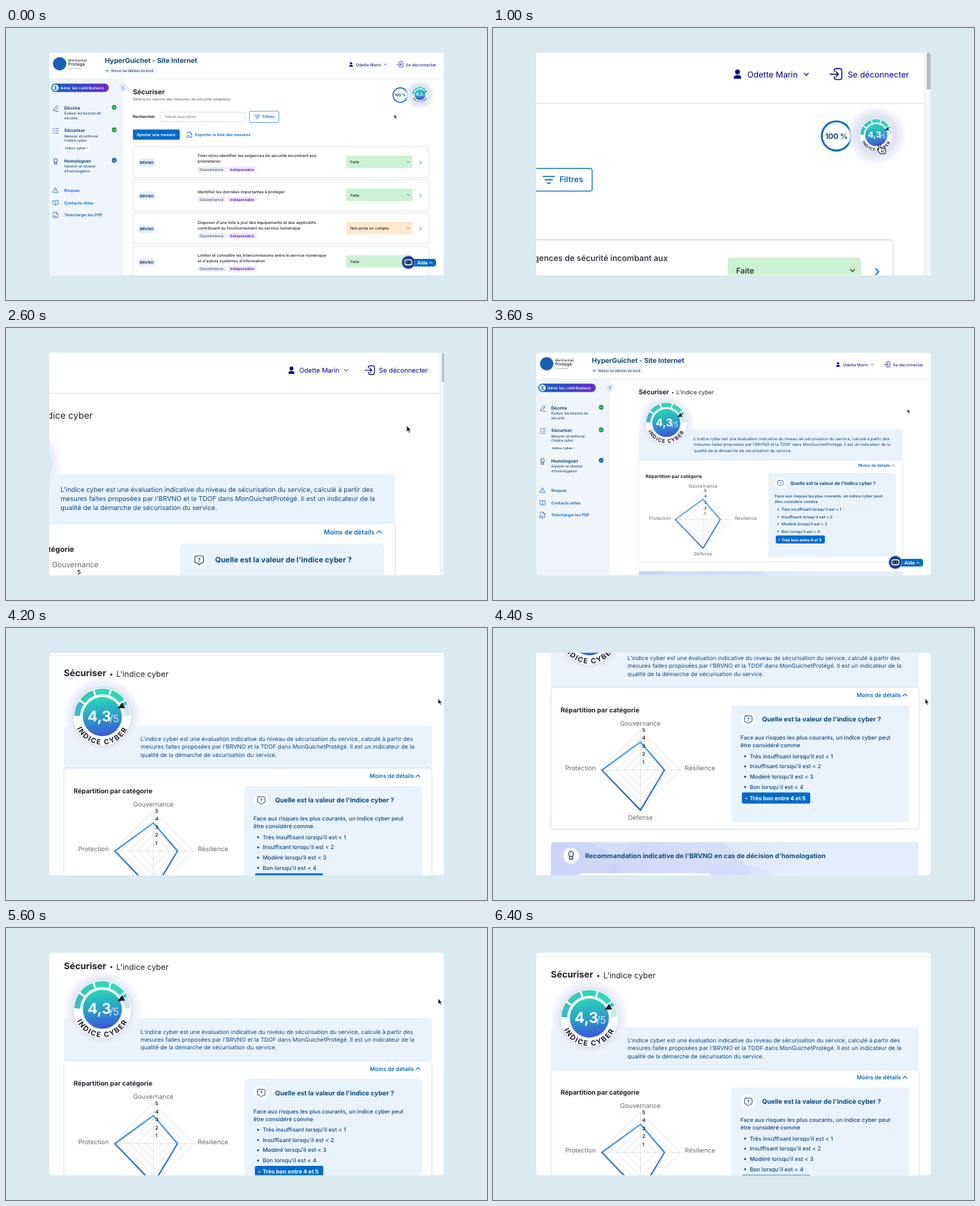
Recreate the animation shown at these times as an HTML page. Size 690 by 390 pixels, loop 7300 ms.

```html
<!DOCTYPE html>
<html lang="fr">
<head>
<meta charset="utf-8">
<title>Indice cyber</title>
<style>
  html, body { margin: 0; width: 100%; height: 100%; overflow: hidden; background: #d9eaf0; }
  svg { display: block; width: 690px; height: 390px; font-family: Inter, "Open Sans", sans-serif; text-rendering: geometricPrecision; }
</style>
</head>
<body>
<svg id="stage" viewBox="0 0 690 390" xmlns="http://www.w3.org/2000/svg"></svg>
<script>
const LOOP = 7300, STEP = 100;
const BLUE = '#036bc8', NAVY = '#0b4a82', INDIGO = '#000091', INK = '#22222c', GREY = '#666672';
const AGENCY = 'BRVNO', PRODUCT = 'MonGuichetProtégé';

// Drawing helpers
const text = (x, y, size, str, fill = INK, weight = 400, anchor = 'start') =>
  `<text x="${x}" y="${y}" font-size="${size}" fill="${fill}" font-weight="${weight}" text-anchor="${anchor}">${str.replace(/</g, '&lt;')}</text>`;
const box = (x, y, w, h, r, fill, extra = '') =>
  `<rect x="${x}" y="${y}" width="${w}" height="${h}" rx="${r}" fill="${fill}" ${extra}/>`;
const disc = (x, y, r, fill, extra = '') => `<circle cx="${x}" cy="${y}" r="${r}" fill="${fill}" ${extra}/>`;
const line = (d, color, width = 0.8, extra = '') =>
  `<path d="${d}" fill="none" stroke="${color}" stroke-width="${width}" stroke-linecap="round" stroke-linejoin="round" ${extra}/>`;
const chevron = (x, y, s, color, turn = 0, width = 0.8) =>
  line(`M${-s} ${-s / 2}L0 ${s / 2}L${s} ${-s / 2}`, color, width, `transform="translate(${x} ${y}) rotate(${turn})"`);
const check = (x, y, color) =>
  disc(x, y, 3.4, color) + line(`M${x - 1.4} ${y + 0.1}l1 1l1.8 -2`, '#fff', 0.7);
const medal = (x, y, color) =>
  disc(x, y - 1.2, 2.6, 'none', `stroke="${color}" stroke-width=".8"`) +
  line(`M${x - 1.7} ${y + 1}v3.6l1.7 -1l1.7 1v-3.6`, color);
const docIcon = (x, y) =>
  line(`M${x - 3} ${y - 1}v-3h4l2.4 2.4v5.4h-3M${x + 1} ${y - 4}v2.4h2.4M${x - 3.4} ${y + 1.4}h3.4v2.6h-3.4z`, BLUE, 0.7);

const defs = `<defs>
  <clipPath id="card"><rect x="62" y="35.5" width="566" height="319" rx="3"/></clipPath>
  <clipPath id="advice"><rect x="209" y="348.4" width="379" height="63.2" rx="3"/></clipPath>
  <linearGradient id="pill"><stop stop-color="#0a62c6"/><stop offset="1" stop-color="#6a2cc4"/></linearGradient>
  <linearGradient id="core" x1=".4" y1="0" x2=".55" y2="1"><stop stop-color="#2dd6b6"/><stop offset=".5" stop-color="#2a9fca"/><stop offset="1" stop-color="#3a55d8"/></linearGradient>
  <linearGradient id="web" x1="0" y1="0" x2="0" y2="1"><stop stop-color="#48a2e2"/><stop offset="1" stop-color="#1f62b4"/></linearGradient>
  <linearGradient id="tint"><stop stop-color="#d0daf8"/><stop offset=".7" stop-color="#e4edfd"/></linearGradient>
  <radialGradient id="halo"><stop offset=".65" stop-color="#dfe3f3"/><stop offset=".85" stop-color="#edf0fa" stop-opacity=".85"/><stop offset="1" stop-color="#f4f5fd" stop-opacity="0"/></radialGradient>
  <path id="rim" d="M-40 0A40 40 0 0 0 40 0"/>
</defs>`;

// Score badge, drawn around 0,0 with a radius of 42
function badge(x, y, scale, halo) {
  const at = (deg, r) => `${(-r * Math.cos(deg * Math.PI / 180)).toFixed(2)} ${(-r * Math.sin(deg * Math.PI / 180)).toFixed(2)}`;
  const arc = (a, b, color) =>
    `<path d="M${at(a, 36)}A36 36 0 0 1 ${at(b, 36)}" fill="none" stroke="${color}" stroke-width="8.4"/>`;
  const shades = ['#3bbcc4', '#34cabd', '#30d6b8', '#30d6b8', '#cfe6ef'];
  const ring = shades.map((c, i) => arc(i * 36 + 2, i * 36 + 33.5, c)).join('') + arc(146, 153, '#30d0b8');
  return `<g transform="translate(${x} ${y}) scale(${scale})">` +
    disc(0, 0, halo, 'url(#halo)') + disc(0, 0, 42, '#fff', 'stroke="#d3d6e2" stroke-width="1"') + ring + disc(0, 0, 28, 'url(#core)') +
    `<path d="M5 -4.5V4.5L-4.5 0Z" fill="#1b1b35" transform="translate(26 -14) rotate(-28)"/>` +
    text(-21.2, 6.6, 21.2, '4,3', '#fff', 700) + text(10.2, 8.2, 14.5, '/5', '#d5e8fb', 400) +
    `<text font-size="10.2" font-weight="700" fill="#1b1b35" letter-spacing="1.6" text-anchor="middle"><textPath href="#rim" startOffset="50%">INDICE CYBER</textPath></text></g>`;
}

// Header and side bar, shared by both pages
function shell() {
  const item = (y, title, lines) => text(83.5, y, 6.4, title, NAVY, 700) +
    lines.map((s, i) => text(83.5, y + 7.4 + i * 6.6, 4.95, s, NAVY, 500)).join('');
  return box(-100, 0, 900, 520, 0, '#fff') +
    box(-100, 73, 268, 440, 0, '#f0f4fb') +
    line('M-100 73H628', '#e3e3ea', 0.6) +
    disc(77, 51.3, 9.6, '#1460b8') +
    text(89.3, 47.8, 4.6, 'MonGuichet', INK, 500) + text(89.3, 54.3, 6.4, 'Protégé', INK, 500) +
    text(89.3, 58.6, 2.2, 'Innovation ' + AGENCY, GREY) +
    text(141.8, 50, 9.66, 'HyperGuichet - Site Internet', NAVY, 700) +
    box(142, 57.3, 72.5, 8, 1.5, '#f1f4fa') + line('M147.3 61.3h-3.4m1.3 -1.3l-1.3 1.3l1.3 1.3', NAVY, 0.6) +
    text(151, 63.1, 4.9, 'Retour au tableau de bord', NAVY, 500) +
    disc(495, 50.6, 1.7, INDIGO) + `<path d="M492.4 55.4v-.8q0 -1.8 2.6 -1.8t2.6 1.8v.8z" fill="${INDIGO}"/>` +
    text(502, 54.5, 5.85, 'Odette Marin', INDIGO) + chevron(544, 52.3, 1.5, INDIGO, 0, 0.6) +
    line('M564 50.2v-.6q0 -1.4 1.4 -1.4h2.4q1.6 0 1.6 1.6v4.6q0 1.6 -1.6 1.6h-2.4q-1.4 0 -1.4 -1.4v-.6M561 52.2h6m-1.8 -1.8l1.8 1.8l-1.8 1.8', INDIGO, 0.7) +
    text(573.5, 54.5, 5.85, 'Se déconnecter', INDIGO) +
    box(65, 79.8, 82.5, 12, 6, 'url(#pill)') + disc(71, 85.8, 4.6, '#fff') + disc(71, 84.6, 1.4, BLUE) +
    `<path d="M68.6 88.4q.4 -1.9 2.4 -1.9t2.4 1.9z" fill="${BLUE}"/>` +
    text(78, 87.9, 5.7, 'Gérer les contributeurs', '#fff', 500) +
    disc(168, 85.6, 5.7, '#dfe9f9') + chevron(167.6, 85.6, 1.8, NAVY, 90) +
    line('M68.2 118.6l.5 -2.4l4.4 -4.8l1.8 1.7l-4.4 4.8zM71.5 119.6h3.4', NAVY, 0.7) +
    item(116.6, 'Décrire', ['Évaluer les besoins de', 'sécurité']) + check(155.2, 113.7, '#18a04a') +
    [144.3, 147.6, 150.9].map(y => line(`M67.4 ${y}l.7 .7l1.1 -1.4M71 ${y}h4`, NAVY, 0.7)).join('') +
    item(149.2, 'Sécuriser', ['Mesurer et renforcer', "l'indice cyber"]) + check(155.2, 146, '#18a04a') +
    box(82.5, 167.8, 37, 8.6, 2, '#fff') + text(84.8, 174, 4.9, 'Indice cyber', NAVY, 600) + chevron(116.4, 172.2, 1.1, NAVY, -90, 0.6) +
    medal(71, 191, NAVY) + item(193, 'Homologuer', ['Générer un dossier', "d'homologation"]) + check(155.2, 189.7, BLUE) +
    line('M71 229.2l3.8 6.4h-7.6zM71 231.6v1.8', BLUE, 0.7) + text(83.5, 235, 5.8, 'Risques', BLUE, 600) +
    line('M71 248.3q-1.6 -1.2 -3.8 -1.2v5.8q2.2 0 3.8 1.2q1.6 -1.2 3.8 -1.2v-5.8q-2.2 0 -3.8 1.2v5.8', BLUE, 0.7) +
    text(83.5, 252.6, 5.8, 'Contacts utiles', BLUE, 600) +
    docIcon(71, 268) + text(83.5, 270.3, 5.7, 'Télécharger les PDF', BLUE, 600) +
    box(628.3, 0, 8, 500, 0, '#f6f6f7', 'stroke="#e6e6e9" stroke-width=".4"') + box(629.9, 20, 2.8, 43, 0.6, '#b9b9bb');
}

const help = box(580, 331, 37, 11, 4, BLUE) + text(590, 339, 6.7, 'Aide', '#fff', 700) + chevron(609.5, 336.6, 2, '#fff', 180, 0.9) +
  disc(577.2, 336, 9.8, '#8c86e0') + disc(577.2, 336, 8.8, '#173a86') +
  box(571.3, 331.4, 11.8, 9.2, 4, '#dfe8fb') + box(572.6, 333.2, 9.2, 5.4, 2.5, '#14245c') +
  disc(575, 335.8, 0.9, '#62d8f0') + disc(579.4, 335.8, 0.9, '#62d8f0');

// Page with the list of measures
function listPage() {
  const rows = [
    [192.6, ['Fixer et/ou identifier les exigences de sécurité incombant aux', 'prestataires'], 'Faite'],
    [240, ['Identifier les données importantes à protéger'], 'Faite'],
    [287.7, ["Disposer d'une liste à jour des équipements et des applicatifs", 'contribuant au fonctionnement du service numérique'], 'Non prise en compte'],
    [335.4, ['Limiter et connaître les interconnexions entre le service numérique', "et d'autres systèmes d'information"], 'Faite'],
  ];
  const row = ([y, lines, state]) => {
    const top = lines.length > 1 ? y - 7.2 : y - 3, tag = y + (lines.length > 1 ? 10 : 5.8);
    return box(182, y - 22.4, 424, 44.4, 3, '#fff', 'stroke="#cfd3dc" stroke-width=".6"') +
      box(189, y - 5.6, 25.6, 12, 5, '#e8eefa') + text(201.8, y + 2.5, 5.5, AGENCY, NAVY, 700, 'middle') +
      lines.map((s, i) => text(275, top + i * 8, 5.8, s, INK, 500)).join('') +
      box(275, tag - 4, 40, 8, 2, '#e9edf5') + text(278, tag + 1.9, 5.25, 'Gouvernance', '#4b5b78', 500) +
      box(318.5, tag - 4, 41, 8, 2, '#f0e8fd') + text(321.5, tag + 1.9, 5.1, 'Indispensable', '#5a14c8', 600) +
      box(488, y - 9.7, 95, 17.8, 2, state === 'Faite' ? '#cdf2d3' : '#ffe8cd') +
      text(494, y + 1.5, 5.55, state, INK, 500) + chevron(577, y - 0.6, 1.5, INK, 0, 0.6) +
      chevron(594.6, y + 0.3, 2.2, BLUE, -90);
  };
  return shell() +
    text(182, 95, 9.7, 'Sécuriser', INK, 700) +
    text(182, 104.3, 5.68, 'Mettre en oeuvre des mesures de sécurité adaptées', GREY) +
    text(182, 129.3, 5.6, 'Rechercher', INK, 700) +
    box(222, 120.8, 121, 13.4, 2, '#fff', 'stroke="#c9ccd6" stroke-width=".6"') + text(228, 129.2, 4.97, 'Intitulé, description', GREY) +
    box(349.2, 119.3, 42.2, 16.2, 1.6, '#fff', `stroke="${BLUE}" stroke-width=".6"`) +
    line('M356.5 125h8M358 127.4h5M359.5 129.8h2', BLUE) + text(368, 129.3, 5.7, 'Filtres', BLUE, 600) +
    box(182, 145.6, 67.3, 14.6, 1.6, BLUE) + text(187.5, 155, 5.85, 'Ajouter une mesure', '#fff', 600) +
    docIcon(263, 153) + text(271.3, 155.1, 5.7, 'Exporter la liste des mesures', BLUE, 600) +
    disc(565.5, 96.2, 10.4, '#fff', `stroke="${BLUE}" stroke-width="1.4"`) + text(565.5, 98.2, 5.3, '100 %', NAVY, 700, 'middle') +
    badge(593.9, 95.6, 0.281, 76) + rows.map(row).join('') + help;
}

// Radar chart: the four scores are in grid steps of u
function radar() {
  const cx = 301.2, cy = 274.5, u = 8.26;
  const diamond = (n, e, s, w) => `M${cx} ${cy - n * u}L${cx + e * u} ${cy}L${cx} ${cy + s * u}L${cx - w * u} ${cy}Z`;
  let out = line(`M${cx - 5 * u} ${cy}H${cx + 5 * u}M${cx} ${cy - 5 * u}V${cy + 5 * u}`, '#d5d5da', 0.5);
  for (let i = 1; i <= 5; i++) out += line(diamond(i, i, i, i), '#d5d5da', 0.5);
  out += line(diamond(3.5, 3, 5, 4.8), 'url(#web)', 1.5);
  for (let i = 1; i <= 5; i++) out += text(303, cy - i * u + 1.8, 5.2, String(i), INK, 600);
  return out + text(cx, 228.6, 6.55, 'Gouvernance', GREY, 400, 'middle') + text(cx, 325.6, 6.5, 'Défense', GREY, 400, 'middle') +
    text(255.2, 274.8, 6.5, 'Protection', GREY, 400, 'end') + text(347, 274.8, 6.5, 'Résilience', GREY);
}
function scorePage() {
  const intro = ["L'indice cyber est une évaluation indicative du niveau de sécurisation du service, calculé à partir des",
    `mesures faites proposées par l'${AGENCY} et la TDOF dans ${PRODUCT}. Il est un indicateur de la`,
    'qualité de la démarche de sécurisation du service.'];
  const levels = ["Très insuffisant lorsqu'il est < 1", "Insuffisant lorsqu'il est < 2", "Modéré lorsqu'il est < 3", "Bon lorsqu'il est < 4"];
  return `<g id="scroll">` + shell() +
    text(209, 94.8, 9.25, 'Sécuriser', INK, 700) + disc(257.8, 92.8, 1.1, INK) + text(263, 95.4, 8.18, "L'indice cyber", INK) +
    box(209, 145.4, 379, 44, 3, '#e9f3fe') +
    box(209, 189.2, 379, 146, 2, '#fff', 'stroke="#d3e0f5" stroke-width=".7"') +
    badge(248.6, 136.2, 0.718, 58) +
    intro.map((s, i) => text(288, 161.4 + i * 8.05, 5.91, s, NAVY)).join('') +
    text(524, 199.4, 5.78, 'Moins de détails', BLUE, 600) + chevron(573.6, 197.2, 2, BLUE, 180) +
    text(219, 214.8, 6.68, 'Répartition par catégorie', INK, 700) + radar() +
    box(395, 207.7, 183, 120.6, 3, '#e9f3fe') + disc(412.2, 222.2, 7.4, '#fff') +
    line('M410 218.6h4.6q1.6 0 1.6 1.6v3.2q0 1.6 -1.6 1.6h-.8l-1.5 1.6l-1.5 -1.6h-.8q-1.6 0 -1.6 -1.6v-3.2q0 -1.6 1.6 -1.6z', NAVY, 0.7) +
    text(412.3, 223.7, 4.6, '?', NAVY, 700, 'middle') +
    text(426.5, 224.6, 6.66, "Quelle est la valeur de l'indice cyber ?", NAVY, 700) +
    text(404.2, 243.2, 5.77, 'Face aux risques les plus courants, un indice cyber peut', NAVY, 500) +
    text(404.2, 251.2, 5.77, 'être considéré comme', NAVY, 500) +
    levels.map((s, i) => disc(409, 260.3 + i * 10.5, 1, NAVY) + text(413.7, 262.3 + i * 10.5, 5.8, s, NAVY, 500)).join('') +
    box(405.7, 297.4, 70.4, 11.5, 1.8, BLUE) + disc(410.3, 303.6, 0.8, '#fff') + text(413.7, 305.5, 5.75, 'Très bon entre 4 et 5', '#fff', 700) +
    `<g clip-path="url(#advice)">` + box(209, 348.4, 379, 63.2, 0, 'url(#tint)') +
    disc(232, 398, 52, '#b4bdf0', 'opacity=".22"') + disc(340, 420, 84, '#b4bdf0', 'opacity=".2"') + disc(395, 448, 78, '#c4d2fa', 'opacity=".25"') + `</g>` +
    disc(229.8, 362.7, 8.1, '#fff') + medal(229.8, 362, NAVY) +
    text(244.2, 365.4, 6.75, `Recommandation indicative de l'${AGENCY} en cas de décision d'homologation`, NAVY, 700) +
    box(237.7, 380.7, 136.4, 20.8, 3, '#fff') + text(244.2, 393.6, 5.79, "Durée d'homologation conseillée", NAVY, 700) +
    box(340.3, 383.6, 27.3, 15, 3, '#0f4c8f') + text(353.9, 393.2, 5.8, '3 ans', '#fff', 700, 'middle') +
    `</g>` + help;
}

const pointer = `<g id="pointer"><path id="arrow" d="M0 0V5.6L1.3 4.4L2.2 6.5L3.2 6.1L2.3 4.1H4Z" fill="#111" stroke="#fff" stroke-width=".4"/>
  <path id="hand" d="M-.6 .2Q0 -.5 .6 .2V2.6L3.7 3.2Q4.5 3.5 4.4 4.4L3.8 6.7H.5L-1.6 4.1Q-1.6 3.2 -.6 3.7Z M1.4 4.2V5.8M2.4 4.2V5.8" fill="#fff" stroke="#111" stroke-width=".5" stroke-linejoin="round"/></g>`;

const stage = document.getElementById('stage');
stage.innerHTML = defs + box(0, 0, 690, 390, 0, '#d9eaf0') +
  `<g clip-path="url(#card)"><g id="camera"><g id="list">${listPage()}</g><g id="score">${scorePage()}</g>` +
  disc(599.3, 100.4, 12.2, 'none', 'id="ring" stroke="#111" stroke-width=".6"') + pointer + `</g></g>`;
const el = {};
for (const id of ['camera', 'list', 'score', 'scroll', 'ring', 'pointer', 'arrow', 'hand']) el[id] = document.getElementById(id);

// Motion: tables of [time, ...values]
const VIEWS = { wide: [1, 0, 0], corner: [2.2, -765, -46], panel: [1.393, -208.1, -60.6] };
const CAMERA = [[400, ...VIEWS.wide], [1200, ...VIEWS.corner], [2200, ...VIEWS.corner],
  [3000, ...VIEWS.wide], [3700, ...VIEWS.wide], [4000, ...VIEWS.panel]];
const POINTER = [[400, 557, 124], [1100, 598.6, 100.9], [2500, 598.6, 100.9], [2700, 598, 103],
  [3100, 598, 103], [3600, 594.4, 116.2]];
const SCROLL = [[4100, 0], [4200, 2], [4300, 48], [4400, 118], [4500, 157], [4600, 164], [5000, 164], [5100, 162], [5200, 140],
  [5300, 96], [5400, 54], [5500, 28], [5600, 12.6], [5700, 6], [5800, 2.5], [6000, 1], [6400, 0]];
const FADE = [[5600, 1], [5900, 0]];
const smooth = p => p * p * (3 - 2 * p);

function sample(table, t, ease = p => p) {
  const i = table.findIndex(row => row[0] > t);
  if (i === 0) return table[0].slice(1);
  if (i < 0) return table[table.length - 1].slice(1);
  const a = table[i - 1], b = table[i], p = ease((t - a[0]) / (b[0] - a[0]));
  return a.slice(1).map((v, n) => v + (b[n + 1] - v) * p);
}
const show = (node, on) => node.setAttribute('display', on ? 'inline' : 'none');

function draw(t) {
  const [k, x, y] = sample(CAMERA, t, smooth), [px, py] = sample(POINTER, t, smooth);
  const onScore = t >= 2500, hand = px > 583 && !onScore;
  el.camera.setAttribute('transform', `translate(${x} ${y}) scale(${k})`);
  el.scroll.setAttribute('transform', `translate(0 ${-sample(SCROLL, t)[0] / VIEWS.panel[0]})`);
  el.pointer.setAttribute('transform', `translate(${px} ${py})`);
  el.pointer.setAttribute('opacity', sample(FADE, t)[0]);
  show(el.list, !onScore);
  show(el.score, onScore);
  show(el.hand, hand);
  show(el.arrow, !hand);
  show(el.ring, t >= 2100 && t < 2300);
}

const start = performance.now();
function tick() {
  const t = (performance.now() - start) % LOOP;
  draw(Math.floor(t / STEP) * STEP);
  requestAnimationFrame(tick);
}
tick();
</script>
</body>
</html>
```
